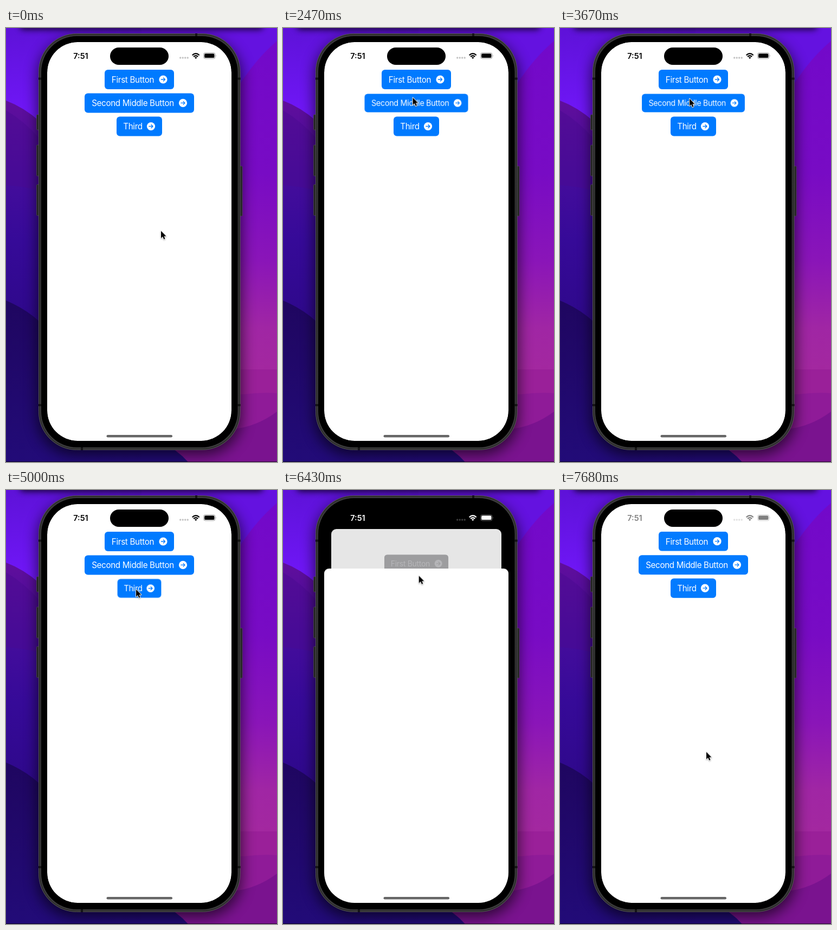
An HTML page that plays this animation: 500x801 px, repeating every 7.72 s.

```html
<!DOCTYPE html>
<html lang="en">
<head>
<meta charset="utf-8">
<title>Button press and sheet</title>
<style>
  html, body { margin: 0; width: 100%; height: 100%; overflow: hidden; background: #1f0968; }
  .stage { position: absolute; left: 0; top: 0; width: 500px; height: 801px; overflow: hidden; font-family: Inter, Roboto, sans-serif; }
  .stage > svg { position: absolute; left: 0; top: 0; }
  svg { display: block; }

  .screen { position: absolute; left: 76px; top: 26px; width: 340px; height: 736px; border-radius: 56px; overflow: hidden; background: #000; }
  .card, .sheet { position: absolute; left: 0; top: 0; width: 340px; height: 736px; background: #fff; }
  .card { overflow: hidden; border-radius: 56px; transform-origin: 50% 0; }
  .shade { position: absolute; inset: 0; background: #000; opacity: 0; }
  .sheet { border-radius: 9px 9px 0 0; transform: translateY(740px); }

  .card, .shade, .sheet, .status, .cursor, .btn {
    animation-duration: 7720ms;
    animation-iteration-count: infinite;
    animation-timing-function: linear;
  }
  .card { animation-name: recede; }
  .shade { animation-name: shade; }
  .sheet { animation-name: sheet; }
  .status { animation-name: status; }
  .cursor { animation-name: cursor; }

  .btn { color: #007aff; fill: #fff; transform-box: fill-box; transform-origin: center; }
  .btn text { font-size: 15.2px; letter-spacing: -.34px; text-anchor: middle; }
  .first { animation-name: press-first, tint; }
  .second { animation-name: press-second, tint; }
  .third { animation-name: press-third, tint; }
  .face { fill: currentColor; }
  .status { color: #000; fill: currentColor; }

  @keyframes press-first {
    0%, 11.2% { transform: none; animation-timing-function: ease-out; }
    14.5%, 15.5% { transform: scale(.94); animation-timing-function: ease-out; }
    18%, 18.4% { transform: none; animation-timing-function: ease-out; }
    21.6%, 25.4% { transform: scale(.94); animation-timing-function: ease-out; }
    28.8%, 100% { transform: none; }
  }
  @keyframes press-second {
    0%, 29% { transform: none; animation-timing-function: ease-out; }
    33%, 35.2% { transform: scale(.94); animation-timing-function: ease-out; }
    39%, 43.2% { transform: none; animation-timing-function: ease-out; }
    47.5%, 53% { transform: scale(.94); animation-timing-function: ease-out; }
    56.8%, 100% { transform: none; }
  }
  @keyframes press-third {
    0%, 64.3% { transform: none; }
    64.77% { transform: scale(.962); }
    65.8%, 66.4% { transform: scale(.94); animation-timing-function: ease-out; }
    69.5%, 100% { transform: none; }
  }
  @keyframes tint {
    0%, 66.5% { color: #007aff; fill: #fff; }
    70.5%, 95.8% { color: #aeaeb0; fill: #c9c9cc; }
    99.2%, 100% { color: #037bff; fill: #fff; }
  }
  @keyframes recede {
    0%, 66.5% { transform: none; border-radius: 56px; animation-timing-function: cubic-bezier(.2, .8, .2, 1); }
    73.4%, 81.2% { transform: translateY(51px) scale(.918); border-radius: 8px; }
    85.88%, 94.2% { transform: translateY(40px) scale(.93); border-radius: 13px; }
    94.56% { transform: translateY(39.3px) scale(.931); border-radius: 14px; }
    96% { transform: translateY(30px) scale(.947); border-radius: 22px; animation-timing-function: ease-out; }
    99.4%, 100% { transform: translateY(-.3px); border-radius: 56px; }
  }
  @keyframes shade {
    0%, 66.5% { opacity: 0; animation-timing-function: ease-out; }
    73.4%, 81.2% { opacity: .09; }
    85.88%, 94.56% { opacity: .105; }
    99.2%, 100% { opacity: 0; }
  }
  @keyframes sheet {
    0%, 66.5% { transform: translateY(740px); animation-timing-function: cubic-bezier(.2, .8, .2, 1); }
    73.4%, 81.2% { transform: translateY(59.5px); animation-timing-function: ease-in-out; }
    85.88%, 94.2% { transform: translateY(203px); }
    94.56% { transform: translateY(210px); }
    96% { transform: translateY(325px); animation-timing-function: ease-out; }
    99%, 100% { transform: translateY(740px); }
  }
  @keyframes status {
    0%, 66.5% { color: #000; }
    70%, 97.8% { color: #fff; }
    99.48%, 100% { color: #808080; }
  }
  @keyframes cursor {
    0%, .3% { transform: translate(286px, 374.5px); animation-timing-function: ease-in-out; }
    8.6%, 25.6% { transform: translate(240px, 92px); animation-timing-function: ease-in-out; }
    28.9%, 36% { transform: translate(239.5px, 128.5px); animation-timing-function: ease-in-out; }
    42%, 54% { transform: translate(239px, 130.5px); animation-timing-function: ease-in-out; }
    60.3%, 69.5% { transform: translate(240px, 183.5px); animation-timing-function: ease-in; }
    73.45% { transform: translate(240px, 162.5px); }
    74.8% { transform: translate(240px, 151px); animation-timing-function: ease-out; }
    77.7%, 81.2% { transform: translate(240px, 98px); animation-timing-function: ease-in-out; }
    85.88%, 94.2% { transform: translate(266px, 244px); }
    94.56% { transform: translate(267px, 251px); }
    96% { transform: translate(269px, 366px); animation-timing-function: ease-out; }
    99.48%, 100% { transform: translate(270px, 483.5px); }
  }
</style>
</head>
<body>
<div class="stage">
  <svg width="500" height="801" viewBox="0 0 500 801">
    <defs>
      <linearGradient id="violet" x2="0" y2="1">
        <stop offset="0" stop-color="#5e12d8"/><stop offset=".25" stop-color="#7418ff"/><stop offset="1" stop-color="#6813f4"/>
      </linearGradient>
      <linearGradient id="indigo" x2="0" y2="1">
        <stop offset="0" stop-color="#600e9c"/><stop offset=".3" stop-color="#460d9c"/><stop offset=".6" stop-color="#360a98"/><stop offset="1" stop-color="#2d0889"/>
      </linearGradient>
      <linearGradient id="navy" x2="0" y2="1">
        <stop offset="0" stop-color="#1f0660"/><stop offset="1" stop-color="#220b78"/>
      </linearGradient>
      <linearGradient id="magenta" gradientUnits="userSpaceOnUse" x1="0" y1="20" x2="0" y2="640">
        <stop offset="0" stop-color="#7209ca"/><stop offset=".4" stop-color="#780bc4"/><stop offset=".66" stop-color="#8a15b8"/><stop offset=".86" stop-color="#a026a4"/><stop offset="1" stop-color="#a3289f"/>
      </linearGradient>
      <linearGradient id="rim" x2="0" y2="1">
        <stop offset="0" stop-color="#3c3c3c"/><stop offset=".5" stop-color="#303030"/><stop offset="1" stop-color="#3c3c3c"/>
      </linearGradient>
      <filter id="blur" x="-30%" y="-30%" width="160%" height="160%"><feGaussianBlur stdDeviation="13"/></filter>
      <filter id="soft" x="-20%" y="-200%" width="140%" height="500%"><feGaussianBlur stdDeviation="6"/></filter>
    </defs>

    <!-- wallpaper -->
    <rect width="250" height="801" fill="url(#violet)"/>
    <path d="M0 134Q32 146 62 172V560H0Z" fill="url(#indigo)"/>
    <path d="M0 152Q34 172 62 204V300Q30 292 0 290Z" fill="#4a0a92" opacity=".5"/>
    <path d="M0 503Q36 518 62 542L250 700V801H0Z" fill="url(#navy)"/>
    <rect x="250" width="250" height="801" fill="url(#magenta)"/>
    <path d="M250 0H500V24Q462 56 430 106L250 120Z" fill="#6412e0"/>
    <path d="M250 630H500V801H250Z" fill="#9a2099"/>
    <path d="M250 676H440Q472 672 500 674V801H250Z" fill="#8f1b98"/>
    <path d="M250 801V740H420Q462 736 500 708V801Z" fill="#7a138f"/>
    <path d="M250 750Q305 766 336 801H250Z" fill="#220b78"/>
    <rect x="25" y="-16" width="450" height="19" rx="8" fill="#000" opacity=".75" filter="url(#soft)"/>
    <rect x="58" y="20" width="377" height="768" rx="70" fill="#000" opacity=".62" filter="url(#blur)"/>
    <rect y="800" width="500" height="1" opacity=".65"/>

    <!-- phone body -->
    <g fill="#252525" stroke="#4a4a4a" stroke-width=".8">
      <rect x="56.5" y="160" width="6" height="28" rx="1.5"/>
      <rect x="56.5" y="216" width="6" height="57" rx="1.5"/>
      <rect x="56.5" y="289" width="6" height="57" rx="1.5"/>
      <rect x="430" y="255" width="6" height="92" rx="1.5"/>
    </g>
    <rect x="60.5" y="10.5" width="371.5" height="768" rx="70" fill="url(#rim)" stroke="#545454"/>
    <rect x="62" y="12" width="368.5" height="765" rx="68.5" fill="none" stroke="#1c1c1c"/>
    <path d="M60 93.5h5M427.500 93.500h5M60 696h5M427.500 696h5M351 10v5M140 774v5" stroke="#151515" stroke-width="4"/>
    <rect x="65" y="15" width="362.500" height="759" rx="66"/>
  </svg>

  <div class="screen">
    <div class="card">
      <svg width="340" height="736" viewBox="76 26 340 736">
        <defs>
          <g id="go">
            <circle r="7.6"/>
            <path d="M-3.600 0H3.400M.5-3L3.500 0L.5 3" fill="none" stroke="currentColor" stroke-width="1.3" stroke-linecap="round" stroke-linejoin="round"/>
          </g>
        </defs>
        <g class="btn first">
          <rect class="face" x="182" y="77" width="128" height="36" rx="6"/>
          <text x="234" y="101">First Button</text>
          <use href="#go" x="290" y="95"/>
        </g>
        <g class="btn second">
          <rect class="face" x="145" y="120.5" width="202" height="36" rx="6"/>
          <text x="234" y="144.2">Second Middle Button</text>
          <use href="#go" x="326.5" y="138.4"/>
        </g>
        <g class="btn third">
          <rect class="face" x="204" y="163.5" width="84" height="36" rx="6"/>
          <text x="234" y="187.3">Third</text>
          <use href="#go" x="267.5" y="181.5"/>
        </g>
      </svg>
      <div class="shade"></div>
    </div>
    <div class="sheet"></div>
  </div>

  <svg width="500" height="801" viewBox="0 0 500 801">
    <rect x="192" y="36" width="108" height="32" rx="16"/>
    <g class="status">
      <text x="138" y="56.5" font-size="14.5" font-weight="600" text-anchor="middle">7:51</text>
      <g opacity=".24">
        <circle cx="321.700" cy="55" r="1.700"/><circle cx="326.200" cy="55" r="1.700"/>
        <circle cx="330.700" cy="55" r="1.700"/><circle cx="335.200" cy="55" r="1.700"/>
      </g>
      <g fill="none" stroke="currentColor" stroke-width="2.1">
        <path d="M343.700 50.200Q350.200 44 356.700 50.200M346.100 52.900Q350.200 49.200 354.300 52.900"/>
      </g>
      <path d="M347.900 54.500Q350.200 52.700 352.500 54.500L350.200 57Z"/>
      <rect x="364.500" y="45.800" width="21.500" height="10.800" rx="3.400" fill="none" stroke="currentColor" opacity=".4"/>
      <rect x="366" y="47.300" width="18.500" height="7.800" rx="2.200"/>
      <path d="M387 49.500Q388.400 51.200 387 53Z" opacity=".45"/>
    </g>
    <rect x="185.500" y="751" width="121.500" height="4.600" rx="2.300" fill="#666"/>
    <g class="cursor">
      <path d="M0 0V13.400L3.100 10.600L5.300 15.600L7.600 14.600L5.400 9.800H9.600Z" stroke="#fff" stroke-width="1.800" stroke-linejoin="round" paint-order="stroke" style="filter:drop-shadow(0 1px 1px rgba(0,0,0,.3))"/>
    </g>
  </svg>
</div>
</body>
</html>
```
